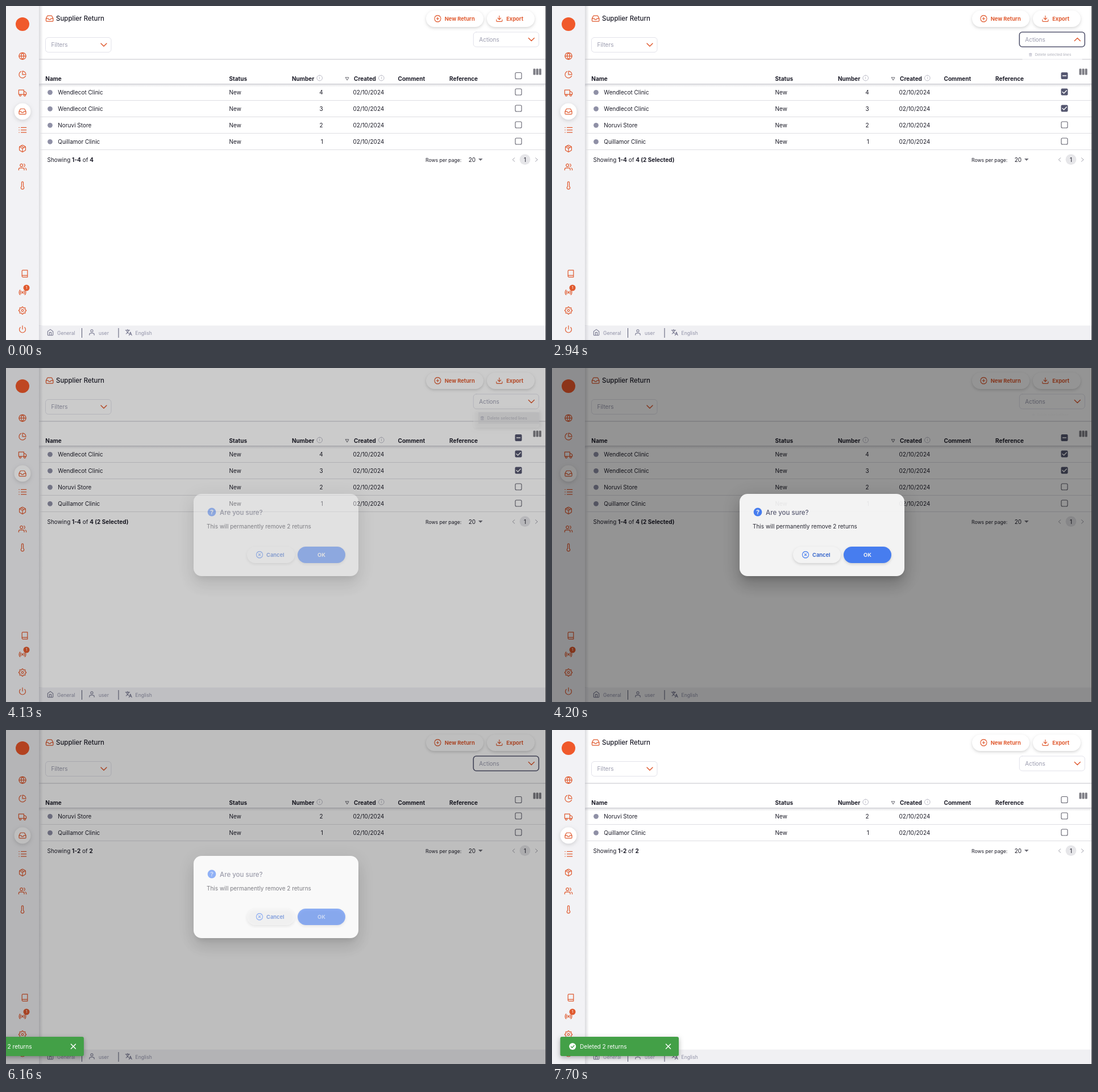
These frames come from a looping animation (950 by 589 pixels, 7770 ms). An HTML page with a canvas:

```html
<!DOCTYPE html>
<html lang="en">
<head>
<meta charset="utf-8">
<title>Supplier Return</title>
<style>
html, body { margin: 0; width: 100%; height: 100%; overflow: hidden; background: #fff; }
canvas { display: block; }
</style>
</head>
<body>
<canvas id="stage" width="950" height="589"></canvas>
<script>
const W = 950, H = 589, LOOP = 7770, STEP = 70;
const ORANGE = '#e05a2f', BLUE = '#3e7bfa', SLATE = '#555770', MUTED = '#8f90a6', INK = '#1c1c28';
const stage = document.getElementById('stage').getContext('2d');
const sheet = document.createElement('canvas');
sheet.width = W;
sheet.height = H;
const modal = sheet.getContext('2d');
let c = stage;

// Icons on a 24 unit grid
const ring = 'M12 2a10 10 0 1 0 .01 0z';
const icons = {
  globe: ring + 'M2 12h20M12 2a15.3 15.3 0 0 1 4 10 15.3 15.3 0 0 1-4 10 15.3 15.3 0 0 1-4-10 15.3 15.3 0 0 1 4-10z',
  pie: 'M21.2 15.9A10 10 0 1 1 8 2.8M22 12A10 10 0 0 0 12 2v10z',
  truck: 'M1 3h15v13H1zM16 8h4l3 3v5h-7zM5.5 16a2.5 2.5 0 1 0 .01 0zM18.5 16a2.5 2.5 0 1 0 .01 0z',
  inbox: 'M22 12h-6l-2 3h-4l-2-3H2M5.5 5.1L2 12v6a2 2 0 0 0 2 2h16a2 2 0 0 0 2-2v-6l-3.5-6.9A2 2 0 0 0 16.8 4H7.2a2 2 0 0 0-1.7 1.1z',
  list: 'M8 5h15M8 12h15M8 19h15M2 5h.5M2 12h.5M2 19h.5',
  box: 'M16.5 9.4l-9-5.2M21 16V8a2 2 0 0 0-1-1.7l-7-4a2 2 0 0 0-2 0l-7 4A2 2 0 0 0 3 8v8a2 2 0 0 0 1 1.7l7 4a2 2 0 0 0 2 0l7-4a2 2 0 0 0 1-1.7zM3.3 7L12 12l8.7-5M12 22V12',
  users: 'M17 21v-2a4 4 0 0 0-4-4H5a4 4 0 0 0-4 4v2M9 3a4 4 0 1 0 .01 0zM23 21v-2a4 4 0 0 0-3-3.9M16 3.1a4 4 0 0 1 0 7.8',
  thermo: 'M14.5 14.8V3.5a2.5 2.5 0 0 0-5 0v11.3a4.5 4.5 0 1 0 5 0z',
  book: 'M4 19.5A2.5 2.5 0 0 1 6.5 17H20M6.5 2H20v20H6.5A2.5 2.5 0 0 1 4 19.5v-15A2.5 2.5 0 0 1 6.5 2z',
  radio: 'M12 10a2 2 0 1 0 .01 0zM16.2 7.8a6 6 0 0 1 0 8.4M7.8 16.2a6 6 0 0 1 0-8.4M19 5a10 10 0 0 1 0 14M5 19a10 10 0 0 1 0-14',
  power: 'M18.4 6.6a9 9 0 1 1-12.8 0M12 2v10',
  home: 'M3 9l9-7 9 7v11a2 2 0 0 1-2 2H5a2 2 0 0 1-2-2zM9 22V12h6v10',
  user: 'M20 21v-2a4 4 0 0 0-4-4H8a4 4 0 0 0-4 4v2M12 3a4 4 0 1 0 .01 0z',
  language: 'M1 5h14M8 2v3M12 5c-1 5-5 9-9 12M5 8c2 4 4 6 7 8M13 22l4.5-11L22 22M14.5 18.5h6',
  download: 'M21 15v4a2 2 0 0 1-2 2H5a2 2 0 0 1-2-2v-4M7 10l5 5 5-5M12 15V3',
  plus: ring + 'M12 8v8M8 12h8',
  cancel: ring + 'M15 9l-6 6M9 9l6 6',
  trash: 'M4 6h16M9 6V3h6v3M6 6v15h12V6M10 10v7M14 10v7'
};
for (const name in icons) icons[name] = new Path2D(icons[name]);
icons.gear = gear();

function gear() {
  const p = new Path2D();
  for (let i = 0; i <= 96; i++) {
    const a = i / 96 * Math.PI * 2, r = 9.4 + 1.5 * Math.tanh(2 * Math.cos(8 * a));
    p.lineTo(12 + r * Math.cos(a), 12 + r * Math.sin(a));
  }
  p.moveTo(15, 12);
  p.arc(12, 12, 3, 0, 7);
  return p;
}

function icon(name, x, y, color = ORANGE, size = 14.5, lw = 2) {
  c.save();
  c.translate(x, y);
  c.scale(size / 24, size / 24);
  c.translate(-12, -12);
  c.strokeStyle = color;
  c.lineWidth = lw;
  c.lineCap = c.lineJoin = 'round';
  c.stroke(icons[name]);
  c.restore();
}

function text(s, x, y, { size = 10, weight = 400, color = INK, align = 'left' } = {}) {
  c.font = `${weight} ${size}px Inter, sans-serif`;
  c.textAlign = align;
  c.fillStyle = color;
  c.fillText(s, x, y + size * .36);
  return x + c.measureText(s).width;
}

function rect(x, y, w, h, color) {
  c.fillStyle = color;
  c.fillRect(x, y, w, h);
}

function box(x, y, w, h, r, fill, stroke, lw = 1) {
  c.beginPath();
  c.roundRect(x, y, w, h, r);
  if (fill) { c.fillStyle = fill; c.fill(); }
  if (stroke) { c.strokeStyle = stroke; c.lineWidth = lw; c.stroke(); }
}

function disc(x, y, r, fill, stroke, lw) {
  box(x - r, y - r, 2 * r, 2 * r, r, fill, stroke, lw);
}

function line(points, color, lw = 1) {
  c.beginPath();
  points.forEach(([x, y]) => c.lineTo(x, y));
  c.strokeStyle = color;
  c.lineWidth = lw;
  c.lineCap = c.lineJoin = 'round';
  c.stroke();
}

// Shadow alone, cast by a shape outside the canvas
function shade(x, y, w, h, r, dy, blur, spread, alpha) {
  c.save();
  c.shadowColor = `rgba(0,0,0,${alpha})`;
  c.shadowBlur = blur;
  c.shadowOffsetX = 3000;
  c.shadowOffsetY = dy;
  box(x - spread - 3000, y - spread, w + 2 * spread, h + 2 * spread, r + spread, '#000');
  c.restore();
}

function pill(x, y, w, h, fill = '#fff') {
  shade(x, y, w, h, h / 2, 2, 5, 0, .16);
  box(x, y, w, h, h / 2, fill);
}

function fade(x0, y0, x1, y1, alpha) {
  const g = c.createLinearGradient(x0, y0, x1, y1);
  g.addColorStop(0, `rgba(40,41,61,${alpha})`);
  g.addColorStop(1, 'rgba(40,41,61,0)');
  return g;
}

function bezier(x1, y1, x2, y2) {
  const at = (u, a, b) => 3 * (1 - u) * (1 - u) * u * a + 3 * (1 - u) * u * u * b + u * u * u;
  return p => {
    if (p <= 0) return 0;
    if (p >= 1) return 1;
    let lo = 0, hi = 1;
    for (let i = 0; i < 24; i++) {
      const mid = (lo + hi) / 2;
      if (at(mid, x1, x2) < p) lo = mid; else hi = mid;
    }
    return at(lo, y1, y2);
  };
}
const easeInOut = bezier(.4, 0, .2, 1), easeOut = bezier(0, 0, .2, 1);
const tween = (t, start, length, ease = easeInOut) => ease((t - start) / length);
const within = (t, a, b) => t >= a && t < b;

function sidebar() {
  rect(0, 0, 58, H, '#f2f2f5');
  rect(58, 0, 7, H, fade(58, 0, 65, 0, .17));
  disc(29, 32, 12, '#f0592b');
  shade(14.5, 171.5, 29, 29, 14.5, 2, 6, 0, .15);
  disc(29, 186, 14.5, '#fff');
  ['globe', 'pie', 'truck', 'inbox', 'list', 'box', 'users', 'thermo'].forEach((name, i) =>
    icon(name, 29, 88.3 + i * 32.6));
  icon('book', 33, 472);
  icon('radio', 29, 505);
  disc(36, 497, 5.5, ORANGE);
  text('1', 36, 497, { size: 6.5, color: '#fff', align: 'center' });
  icon('gear', 29, 537);
  icon('power', 29, 570);
}

function footer() {
  rect(58, 563.5, W - 58, 26, '#f0f0f3');
  rect(58, 563, 7, 26, fade(58, 0, 65, 0, .12));
  const item = (name, label, x, tx) => {
    icon(name, x, 575.5, '#70718a', 12.5);
    text(label, tx, 576.5, { size: 8.6, color: MUTED });
  };
  item('home', 'General', 78, 90);
  item('user', 'user', 151, 163);
  item('language', 'English', 216, 227.5);
  [133, 197.5].forEach(x => rect(x, 568, 1, 17, SLATE));
}

function select(label, x, y, w, focused, open) {
  if (focused) box(x, y, w, 26, 5, '#fff', SLATE, 1.6);
  else box(x, y, w, 26, 5, '#fff', '#e2e2ea');
  text(label, x + 10, y + 13.3, { color: '#9a9bae' });
  const cx = x + w - 13, cy = y + 13, d = open ? -2.6 : 2.6;
  line([[cx - 5, cy - d], [cx, cy + d], [cx + 5, cy - d]], ORANGE, 1.4);
}

function toolbar(s) {
  icon('inbox', 76.7, 22, ORANGE, 15);
  text('Supplier Return', 88, 22, { size: 11.5, weight: 500 });
  const button = (x, w, name, label, tx) => {
    pill(x, 8, w, 29);
    icon(name, tx - 12.3, 22.3, ORANGE, 13.5);
    text(label, tx, 22.7, { size: 9.3, weight: 700, color: ORANGE });
  };
  button(739, 101, 'plus', 'New Return', 771.7);
  button(846, 84, 'download', 'Export', 880.2);
  select('Filters', 69.5, 55.5, 115.5, false, false);
  select('Actions', 822.3, 46, 115, s.focused, s.open);
  rect(58, 93.5, W - 58, 1, '#c4c4ca');
}

function checkbox(y, state) {
  const x = 901.5;
  if (!state) return box(x - 5.5, y - 5.5, 11, 11, 2, '#fff', '#62626e', 1.1);
  box(x - 6, y - 6, 12, 12, 2, SLATE);
  if (state === 'some') line([[x - 3, y], [x + 3, y]], '#fff', 1.5);
  else line([[x - 3.5, y], [x - 1, y + 2.5], [x + 3.8, y - 2.5]], '#fff', 1.4);
}

function tableHead(some) {
  const bold = { weight: 700 };
  const heads = { Name: 69.3, Status: 392.5, Number: 503, Created: 612, Comment: 689.5, Reference: 780 };
  for (const label in heads) text(label, heads[label], 128.8, bold);
  [551.7, 660.3].forEach(x => {
    disc(x, 127, 4.8, null, '#b4b4c0', .9);
    text('i', x, 127, { size: 6.5, color: '#a0a0b0', align: 'center' });
  });
  line([[597.3, 126], [603, 126], [600.2, 131], [597.3, 126]], '#55555f', .9);
  [927.5, 932.6, 937.7].forEach(x => box(x, 110.5, 4, 11, 1.2, '#7d7d84'));
  checkbox(123, some && 'some');
  rect(58, 137, W - 58, 1, '#c9c9cf');
  rect(58, 138, W - 58, 5, fade(0, 138, 0, 143, .13));
}

const records = [['Wendlecot Clinic', 4], ['Wendlecot Clinic', 3], ['Noruvi Store', 2], ['Quillamor Clinic', 1]];

function table(s) {
  const rows = s.removed ? records.slice(2) : records, n = rows.length;
  tableHead(s.selected);
  rows.forEach(([name, number], i) => {
    const y = 152.3 + 29 * i;
    disc(77.5, y, 4.4, MUTED);
    text(name, 91.3, y);
    text('New', 392.5, y);
    text(number, 557.7, y, { align: 'right' });
    text('02/10/2024', 610.5, y);
    checkbox(y - .8, i < s.selected);
    rect(58, 166 + 29 * i, W - 58, 1, '#dedee2');
  });
  const y = 155 + 29 * n, bold = { weight: 700 };
  let x = text('Showing ', 72.5, y);
  x = text(`1-${n}`, x, y, bold);
  x = text(' of ', x, y);
  text(n + (s.selected ? ` (${s.selected} Selected)` : ''), x, y, bold);
  text('Rows per page:', 738, y + .5, { size: 8.6 });
  text('20', 813.7, y);
  c.beginPath();
  [[831, -2], [838.6, -2], [834.8, 2]].forEach(([px, dy]) => c.lineTo(px, y + dy));
  c.fillStyle = '#6f6f78';
  c.fill();
  disc(913, y - .3, 9.4, '#e6e6e9');
  text('1', 913, y, { align: 'center' });
  [[893, 1.8], [933.3, -1.8]].forEach(([px, d]) =>
    line([[px + d, y - 3.2], [px - d, y], [px + d, y + 3.2]], '#a0a0aa', 1));
}

function menu(t) {
  const opening = tween(t, 2871, 170);
  const alpha = opening * (1 - tween(t, 4060, 190));
  if (alpha <= 0) return;
  const scale = .75 + .25 * opening * (1 - tween(t, 4125, 127));
  c.save();
  c.globalAlpha = alpha;
  c.translate(880, 73.5);
  c.scale(scale, scale * scale);
  c.translate(-880, -73.5);
  shade(822, 73.5, 116, 31.5, 4, 2, 7, 0, .2);
  box(822, 73.5, 116, 31.5, 4, '#fff');
  if (t >= 3850) rect(831, 78, 107, 20.5, '#dcdce0');
  icon('trash', 837.8, 88.5, MUTED, 8, 2.4);
  text('Delete selected lines', 846.5, 88.5, { size: 7.1, weight: 500, color: '#8c8d9c' });
  c.restore();
}

function dialog(t) {
  const closing = t > 6090, loading = within(t, 5530, 6091);
  const alpha = tween(t, 4055, 232) * (1 - tween(t, 6085, 225));
  if (alpha <= .001) return;
  rect(0, 0, W, H, `rgba(0,0,0,${.47 * alpha})`);

  const panel = closing ? alpha ** .15 : alpha;
  c = modal;
  c.clearRect(0, 0, W, H);
  c.globalAlpha = alpha / panel;
  shade(330, 222, 290, 145, 14, 8, 11, -5, .2);
  shade(330, 222, 290, 145, 14, 17, 27, 2, .14);
  shade(330, 222, 290, 145, 14, 6, 33, 6, .12);
  c.globalAlpha = 1;
  box(330, 222, 290, 145, 14, '#fff');
  c.globalAlpha = alpha / panel;
  disc(362, 254, 7.4, BLUE);
  text('?', 362, 254.3, { size: 11, weight: 700, color: '#fff', align: 'center' });
  text('Are you sure?', 376, 254.5, { size: 11.5, weight: 500, color: SLATE });
  text('This will permanently remove 2 returns', 353, 279);
  pill(424, 315, 84, 29);
  if (loading) {
    box(424.5, 315.5, 83, 28, 14, null, '#e2e2e8');
    icon('cancel', 447.5, 329.3, MUTED, 13.5);
    text('Cancel', 459.5, 329.8, { size: 9, weight: 700, color: '#c4c4d0' });
    spinner(t);
  } else {
    icon('cancel', 446, 329.3, BLUE, 13.5);
    text('Cancel', 458, 329.8, { size: 9.3, weight: 700, color: '#3568d4' });
    pill(513, 315, 84, 29, BLUE);
    text('OK', 555, 329.8, { size: 9.3, weight: 700, color: '#fff', align: 'center' });
  }
  c.globalAlpha = 1;
  c = stage;
  c.globalAlpha = panel;
  c.drawImage(sheet, 0, 0);
  c.globalAlpha = 1;
}

function spinner(t) {
  const turn = Math.PI * (1 + 2 * (t - 6090) / 1400);
  const half = .4 + 1.1 * Math.sin(Math.PI * (t - 5530) / 560);
  c.beginPath();
  c.arc(555, 329.3, 9.7, turn - half, turn + half);
  c.strokeStyle = ORANGE;
  c.lineWidth = 1.5;
  c.lineCap = 'butt';
  c.stroke();
}

function toast(t) {
  if (t < 6100) return;
  c.save();
  c.translate(-226 * (1 - tween(t, 6097, 225, easeOut)), 0);
  shade(14.5, 541, 208.5, 34, 3, 3, 8, 0, .3);
  box(14.5, 541, 208.5, 34, 3, '#43a047');
  disc(36.2, 558, 6, '#fff');
  line([[33.5, 558.2], [35.4, 560.2], [39, 556.2]], '#43a047', 1.3);
  text('Deleted 2 returns', 49, 558.3, { size: 10.1, color: '#fff' });
  line([[200.5, 554], [208.5, 562]], '#fff', 1.5);
  line([[208.5, 554], [200.5, 562]], '#fff', 1.5);
  c.restore();
}

function draw(t) {
  const removed = t >= 6160, open = within(t, 2940, 4060);
  const state = {
    removed, open,
    focused: open || within(t, 6160, 7700),
    selected: removed ? 0 : (t >= 1120) + (t >= 2030)
  };
  rect(0, 0, W, H, '#fff');
  sidebar();
  toolbar(state);
  table(state);
  footer();
  rect(949, 0, 1, H, '#55555c');
  menu(t);
  dialog(t);
  toast(t);
}

const begin = performance.now();
function tick() {
  const t = (performance.now() - begin) % LOOP;
  draw(Math.floor(t / STEP) * STEP);
  requestAnimationFrame(tick);
}
tick();
</script>
</body>
</html>
```
